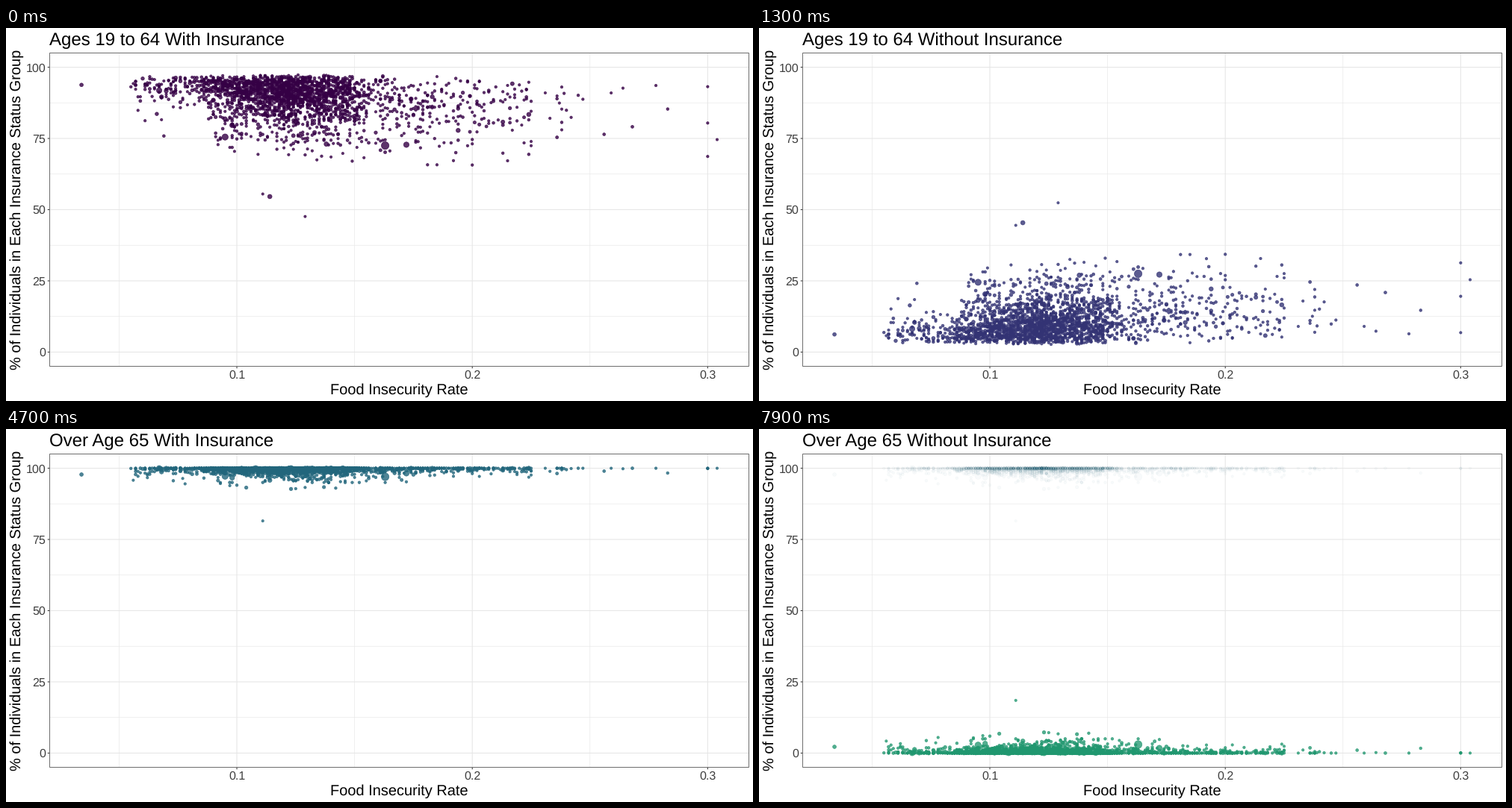
Write a matplotlib script that moves like this. It is 1000 by 500 pixels and loops after 8000 ms.

```python
import numpy as np
import matplotlib.pyplot as plt
from matplotlib.animation import FuncAnimation
from matplotlib.patches import Rectangle

W, H, DPI = 1000, 500, 100
PX = 72 / DPI                       # points per pixel
TICK_MS, LOOP_MS = 100, 8000
STARTS = (500, 3900, 7300)          # fade start times
STEP_MS, STEPS = 200, 5
ALPHA, STROKE, MIN_D = 0.8, 0.71, 4.0
LEFT, TOP, RIGHT, BOTTOM = 58.5, 33.5, 994.5, 453.5

TITLES = ("Ages 19 to 64 With Insurance", "Ages 19 to 64 Without Insurance",
          "Over Age 65 With Insurance", "Over Age 65 Without Insurance")
COLORS = ("#350045", "#333374", "#22667C", "#20976F")

# Extreme counties: rate, % uninsured 19-64, % uninsured 65+, dot diameter
EXTREMES = [
    (0.034, 6.2, 2.2, 5.5), (0.095, 24.5, 2.8, 9), (0.111, 44.5, 18.5, MIN_D),
    (0.114, 45.4, 4.2, 6.5), (0.129, 52.4, 0, MIN_D), (0.163, 27.5, 3, 11),
    (0.172, 27.2, 1.8, 8), (0.304, 25.4, 0, MIN_D),
]

rng = np.random.default_rng(7)


def sample_rates():
    core = rng.normal(0.123, 0.021, 1400)
    core = core[(core > 0.085) & (core < 0.1525)]
    wide = 0.15 * np.exp(0.25 * rng.normal(size=800))
    wide = wide[(wide > 0.075) & (wide < 0.223)]
    low = 0.054 + 0.05 * rng.random(230) ** 0.75
    tail = 0.222 + np.minimum(rng.exponential(0.025, 34), 0.078)
    return np.round(np.concatenate([core, wide, low, tail]), 3)


def sample_young(rate):
    """Uninsured share under 65: a skewed spread that grows with the rate."""
    mean = np.interp(rate, (0.05, 0.1, 0.15, 0.2), (4.2, 6.4, 10.3, 13))
    return 2.6 + np.minimum(rng.gamma(2.2, mean / 2.2), 22 + 12 * rng.random(len(rate)))


def sample_old(n):
    """Uninsured share over 65: half exactly zero, the rest near it."""
    share = rng.exponential(1.05, n) * (rng.random(n) < 0.52)
    return np.where(rng.random(n) < 0.008, 5 + 3 * rng.random(n), np.minimum(share, 5))


def counties():
    rate = sample_rates()
    n = len(rate)
    diam = MIN_D + np.minimum(0.18 * np.exp(1.1 * rng.normal(size=n)), 4)
    young = sample_young(rate)
    high = rng.random(n) < 0.12 * np.exp(-((rate - 0.098) / 0.005) ** 2)
    young[high] += 20 * rng.random(high.sum())
    rows = np.column_stack([rate, young, sample_old(n), diam])
    return np.vstack([rows, EXTREMES]).T


def to_x(rate):
    return LEFT + (rate - 0.0205) * (RIGHT - LEFT) / 0.297


def to_y(pct):
    return BOTTOM - (pct + 5) * (BOTTOM - TOP) / 110


plt.rcParams["font.family"] = "Liberation Sans"
plt.rcParams["text.hinting"] = "none"
fig = plt.figure(figsize=(W / DPI, H / DPI), dpi=DPI, facecolor="white")
ax = fig.add_axes([0, 0, 1, 1])
ax.set_xlim(0, W)
ax.set_ylim(H, 0)
ax.axis("off")


def line(xs, ys, color, width=1.07):
    ax.plot(xs, ys, color=color, lw=width * PX, zorder=1, solid_capstyle="butt", snap=False)


def label(x, y, text, size, color="black", **kw):
    kw = {"ha": "left", "va": "baseline", **kw}
    return ax.text(x, y, text, fontsize=size * PX, color=color, **kw)


def draw_panel():
    grid, tick, gray = "#E6E6E6", "#333333", "#3E3E3E"
    for v in np.arange(12.5, 100, 25):
        line((LEFT, RIGHT), (to_y(v),) * 2, grid, 0.6)
    for v in (0.05, 0.15, 0.25):
        line((to_x(v),) * 2, (TOP, BOTTOM), grid, 0.6)
    for v in range(0, 101, 25):
        y = to_y(v)
        line((LEFT, RIGHT), (y, y), grid)
        line((LEFT - 2.75, LEFT), (y, y), tick)
        label(53.3, y + 5.8, str(v), 16, gray, ha="right")
    for v in (0.1, 0.2, 0.3):
        x = to_x(v)
        line((x, x), (TOP, BOTTOM), grid)
        line((x, x), (BOTTOM, BOTTOM + 2.75), tick)
        label(x, 470.2, str(v), 16, gray, ha="center")
    ax.add_patch(Rectangle((LEFT, TOP), RIGHT - LEFT, BOTTOM - TOP, fill=False,
                           ec="#6E6E6E", lw=PX, zorder=5, snap=False))
    label((LEFT + RIGHT) / 2, 491, "Food Insecurity Rate", 20, ha="center")
    label(20, (TOP + BOTTOM) / 2, "% of Individuals in Each Insurance Status Group", 20,
          ha="center", rotation=90, rotation_mode="anchor")


draw_panel()
title = label(58, 23, TITLES[0], 24)
rate, young, old, diam = counties()
groups = [
    ax.scatter(to_x(rate), to_y(pct), s=((diam - STROKE) * PX) ** 2, c=color,
               edgecolors=color, linewidths=STROKE * PX, zorder=3, snap=False)
    for pct, color in zip((100 - young, young, 100 - old, old), COLORS)
]


def cubic_in_out(p):
    return 4 * p ** 3 if p < 0.5 else 1 - 4 * (1 - p) ** 3


def update(frame):
    t = frame * TICK_MS
    state, step = 0, 0
    for k, start in enumerate(STARTS):
        if t >= start:
            state, step = k, (t - start) // STEP_MS + 1
    if step >= STEPS:
        state, step = state + 1, 0
    mix = cubic_in_out(step / STEPS)
    for k, dots in enumerate(groups):
        share = {state: 1 - mix, state + 1: mix}.get(k, 0)
        dots.set_alpha(ALPHA * share)
        dots.set_visible(share > 0)
    title.set_text(TITLES[state + (step == STEPS - 1)])
    return [*groups, title]


anim = FuncAnimation(fig, update, frames=LOOP_MS // TICK_MS, interval=TICK_MS,
                     init_func=lambda: update(0), repeat=True)
plt.show()
```
